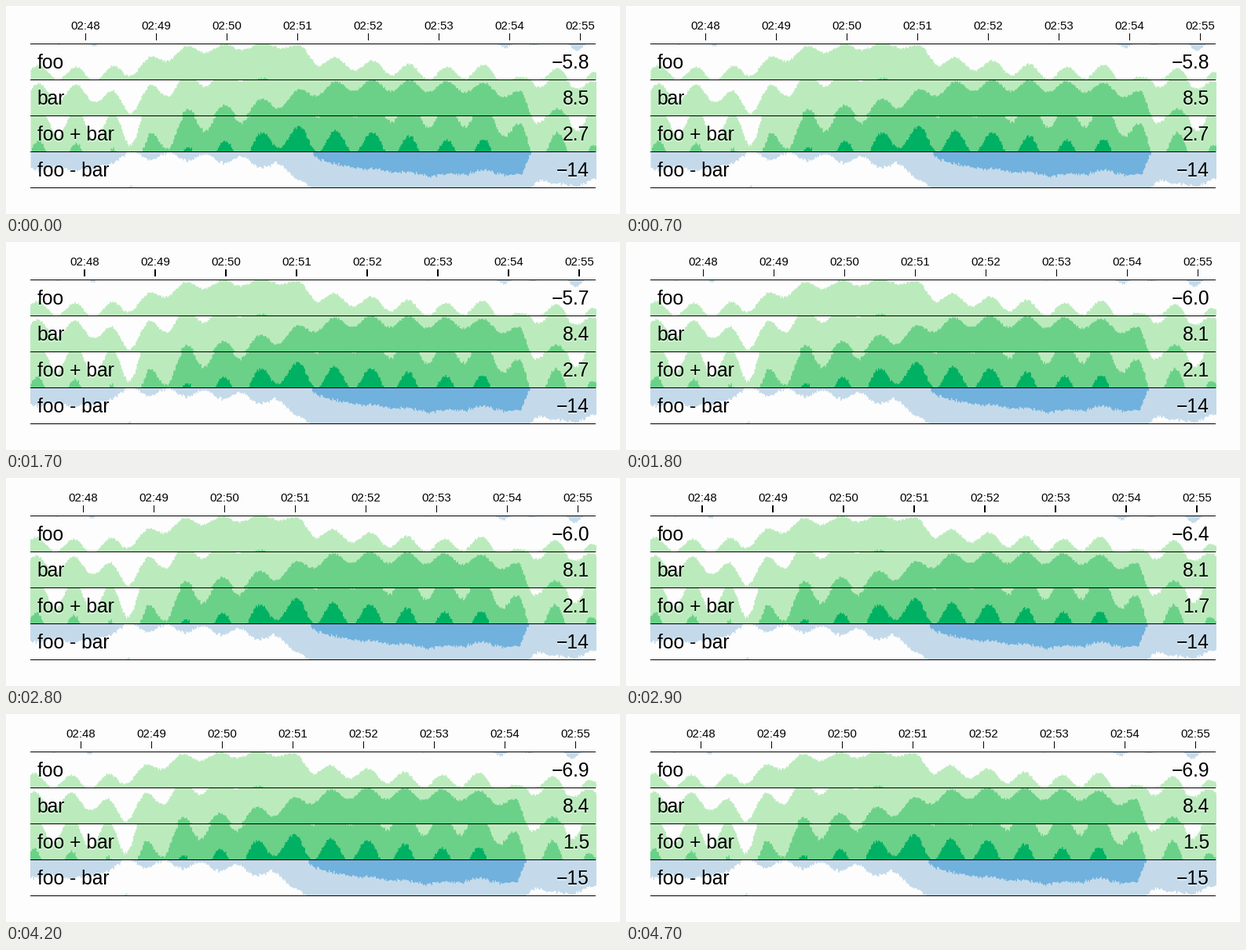
A matplotlib script for the animation above (4800 ms loop, 782x266 px).

```python
import matplotlib.pyplot as plt
import numpy as np
from matplotlib.animation import FuncAnimation
from matplotlib.patches import Rectangle
from matplotlib.transforms import Affine2D

W, H, DPI = 782, 266, 100
LEFT, RIGHT, TOP = 31, 751, 48.5
BAND = 46           # row height, also the height of one colour band
COL = 1.5           # pixels per second of data
MINUTE = 90
CREST, WAVE = 88, 47.2   # first crest and length of the shared ripple
GREENS = ["#bbebbc", "#6bd188", "#00b163"]
BLUES = ["#c4daea", "#70b1dd"]
LABELS = ["foo", "bar", "foo + bar", "foo - bar"]
READINGS = [
    ("−5.8", "8.5", "2.7", "−14"),
    ("−5.7", "8.4", "2.7", "−14"),
    ("−6.0", "8.1", "2.1", "−14"),
    ("−6.4", "8.1", "1.7", "−14"),
    ("−6.9", "8.4", "1.5", "−15"),
]
UPDATES = [8, 18, 29, 39]   # frames at which a new sample arrives

# slow trend of each metric: (x, level)
FOO = [(31, 11), (112, 7), (150, 11), (225, 38), (345, 46), (378, 38),
       (396, 25), (550, 8), (605, 12), (631, 6), (655, -8), (678, 10),
       (728, 1)]
BAR = [(31, 31), (112, 29), (156, 14), (182, 28), (230, 45), (290, 52),
       (345, 64), (395, 80), (440, 86), (600, 83), (632, 79), (656, 69),
       (668, 47), (728, 45), (749, 34)]

plt.rcParams["font.family"] = "Liberation Sans"
rng = np.random.default_rng(7)
xs = np.arange(LEFT, RIGHT + 9, COL)


def metric(trend, swing, damping):
    """Trend plus a ripple that flattens at high levels, plus jitter."""
    level = np.interp(xs, *zip(*trend))
    ripple = np.cos(2 * np.pi * (xs - CREST) / WAVE)
    jitter = rng.uniform(-1.4, 1.4, xs.size)
    return level + (swing - damping * level) * ripple + jitter


foo = metric(FOO, 10, 0.13)
bar = np.clip(metric(BAR, 13, 0.07), 0, 2 * BAND)
rows = [foo, bar, foo + bar, foo - bar]

fig = plt.figure(figsize=(W / DPI, H / DPI), dpi=DPI, facecolor="#fdfdfd")
ax = fig.add_axes([0, 0, 1, 1])
ax.set_xlim(0, W)
ax.set_ylim(H, 0)
ax.axis("off")

scroll = Affine2D()
window = Rectangle((LEFT, TOP), RIGHT - LEFT, 4 * BAND,
                   transform=ax.transData)


def px(n):
    return n * 72 / DPI


def area(values, base, sign, colors):
    for i, color in enumerate(colors):
        h = np.clip(sign * values - i * BAND, 0, BAND)
        fill = ax.fill_between(xs, base, base - sign * h, step="post",
                               color=color, lw=0)
        fill.set_transform(scroll + ax.transData)
        fill.set_clip_path(window)


def caption(x, y, text, ha):
    """Black text with a soft white shadow below it."""
    style = dict(fontsize=px(24.6), ha=ha, va="baseline")
    return [ax.text(x, y + 1.5, text, color="white", alpha=0.5, **style),
            ax.text(x, y, text, color="black", **style)]


def rule(x, y):
    line, = ax.plot(x, y, color="black", lw=px(1), solid_capstyle="butt",
                    snap=False, zorder=2.5)
    return line


values = []
for i, (data, label) in enumerate(zip(rows, LABELS)):
    top = TOP + i * BAND
    area(data, top + BAND, 1, GREENS)
    area(data, top, -1, BLUES)
    caption(39.5, top + 32, label, "left")
    values.append(caption(743, top + 32, "", "right"))

for i in range(5):
    rule([LEFT, RIGHT], [TOP + i * BAND] * 2)

ticks = [(rule([], []), ax.text(0, 30, f"02:{48 + i}", fontsize=px(15),
                                ha="center", va="baseline"))
         for i in range(8)]


def draw(n):
    step = int(np.searchsorted(UPDATES, n, side="right"))
    scroll.clear().translate(-COL * step, 0)
    for i, (line, name) in enumerate(ticks):
        x = 101.5 + i * MINUTE - COL * step
        line.set_data([x, x], [35, 44])
        line.set_linewidth(px(1 + step % 2))
        name.set_x(x)
    for pair, text in zip(values, READINGS[step]):
        for t in pair:
            t.set_text(text)
    return []


anim = FuncAnimation(fig, draw, frames=48, interval=100,
                     init_func=lambda: draw(0), repeat=True, repeat_delay=0,
                     blit=False)
plt.show()
```
